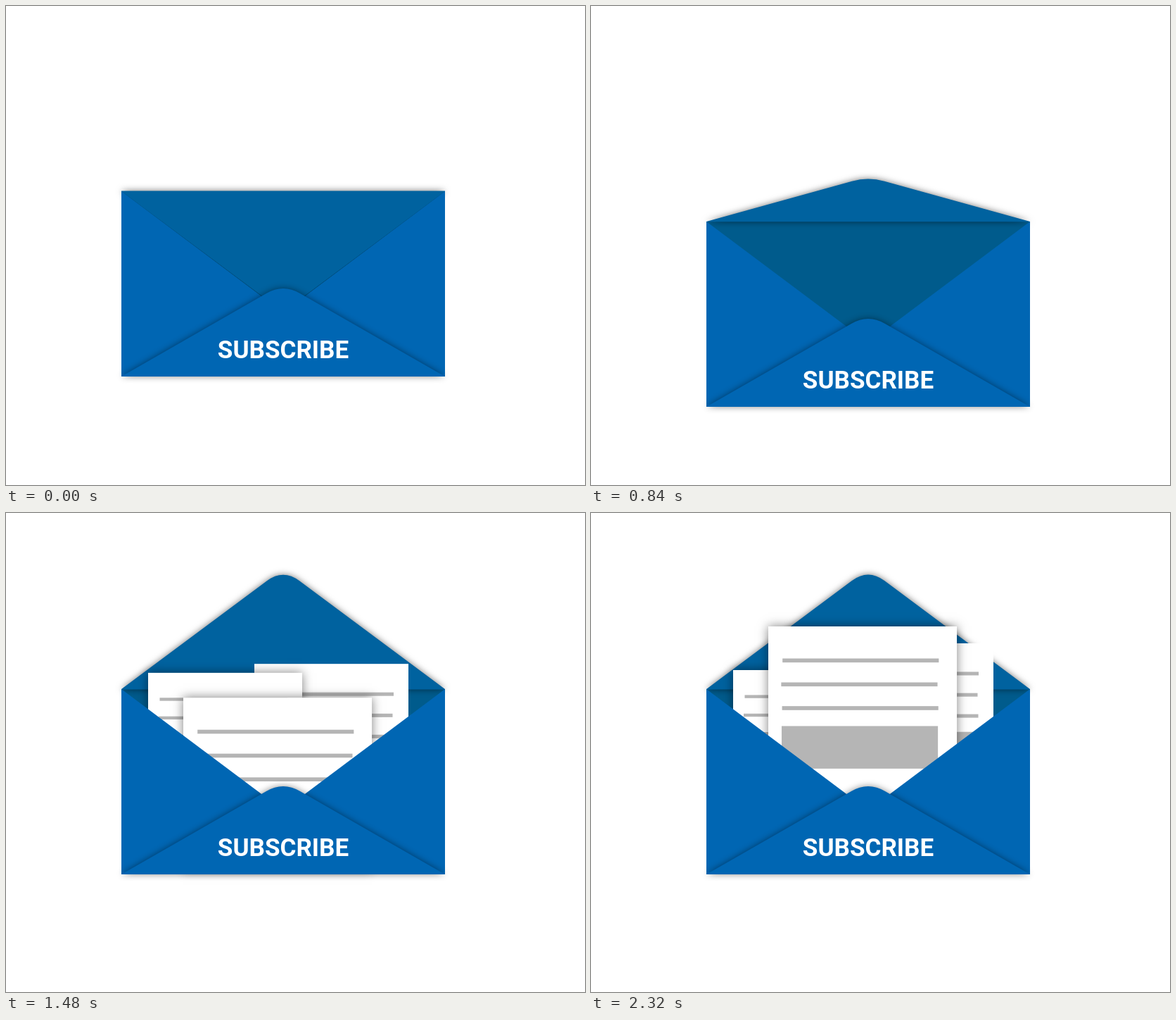
An HTML page with a canvas that plays this animation: 823x680 px, repeating every 2960 ms.

```html
<!DOCTYPE html>
<html lang="en">
<head>
<meta charset="utf-8">
<title>Subscribe envelope</title>
<style>
html, body { margin: 0; width: 100%; height: 100%; overflow: hidden; background: #fff; }
canvas { display: block; }
</style>
</head>
<body>
<canvas id="stage" width="823" height="680"></canvas>
<script>
const ctx = document.getElementById('stage').getContext('2d');
const LOOP = 2960, STEP = 40, MOVE_END = 2320, TURN = 640;
const LEFT = 164, START = 263, LOWEST = 384, REST = 250;
const BLUE = '#0066b3', FLAP = '#00629f', INSIDE = '#005b8c', GREY = '#b5b5b5';

const inside = new Path2D('M0 0H460V263H0Z');
const flap = new Path2D('M0 .5V0L207 -154Q230 -171 253 -154L460 0V.5Z');
const sides = new Path2D('M0 0L230 172L460 0V263H0Z');
const front = new Path2D('M0 263L206 145Q230 131 254 145L460 263Z');

// Back to front; x and top are relative to the envelope.
const papers = [
  { x: 189, top: -65, sx: 1, sy: 1.143, rise: 219, start: 1059, end: 2121, shade: 0 },
  { x: 38, top: -27, sx: 1, sy: 1, rise: 181, start: 860, end: 1860, shade: .5 },
  { x: 88, top: -89, sx: 1.224, sy: 1.286, rise: 243, start: 1274, end: 2320, shade: .5 }
];

const progress = (t, start, end) => Math.min(1, Math.max(0, (t - start) / (end - start)));
const remaining = (t, start, end, power) => (1 - progress(t, start, end)) ** power;

function shadow(alpha, blur) {
  ctx.shadowColor = `rgba(0,0,0,${alpha})`;
  ctx.shadowBlur = blur;
}

function fill(path, color) {
  ctx.fillStyle = color;
  ctx.fill(path);
}

function drawFlap(scale) {
  ctx.save();
  ctx.scale(1, scale);
  shadow(.55, 10);
  fill(flap, FLAP);
  ctx.restore();
}

function drawPaper(p, t) {
  if (t < p.start) return;
  const y = p.top + p.rise * remaining(t, p.start, p.end, 4);
  const height = Math.min(190, (261 - y) / p.sy);
  ctx.save();
  ctx.translate(p.x, y);
  ctx.scale(p.sx, p.sy);
  shadow(p.shade, 14);
  ctx.fillStyle = '#fff';
  ctx.fillRect(0, 0, 219, height);
  shadow(0, 0);
  ctx.beginPath();
  ctx.rect(0, 0, 219, height);
  ctx.clip();
  ctx.fillStyle = GREY;
  ctx.fillRect(16.5, 35.4, 181.5, 4.4);
  ctx.fillRect(15, 61.8, 181.5, 4.4);
  ctx.fillRect(16, 88, 181.5, 4.4);
  ctx.fillRect(15.5, 110, 181.5, 47);
  ctx.restore();
}

function draw(t) {
  const top = t < TURN
    ? START + (LOWEST - START) * (t / TURN) ** 3.16
    : REST + (LOWEST - REST) * remaining(t, TURN, TURN + 1000, 3.9);
  const open = 1 - 2 * remaining(t, TURN, TURN + 1000, 5.2);

  ctx.clearRect(0, 0, 823, 680);
  ctx.save();
  ctx.translate(LEFT, top);
  fill(inside, INSIDE);
  if (open > 0) drawFlap(open);
  for (const p of papers) drawPaper(p, t);
  if (open <= 0) drawFlap(open);
  fill(sides, BLUE);
  shadow(.45, 10);
  fill(front, BLUE);
  shadow(0, 0);
  ctx.fillStyle = '#fff';
  ctx.font = 'bold 35.1px Roboto, sans-serif';
  ctx.textAlign = 'center';
  ctx.fillText('SUBSCRIBE', 230, 236.5);
  ctx.restore();
}

function tick() {
  const t = performance.now() % LOOP;
  draw(Math.min(MOVE_END, Math.floor(t / STEP) * STEP));
  requestAnimationFrame(tick);
}
tick();
</script>
</body>
</html>
```
